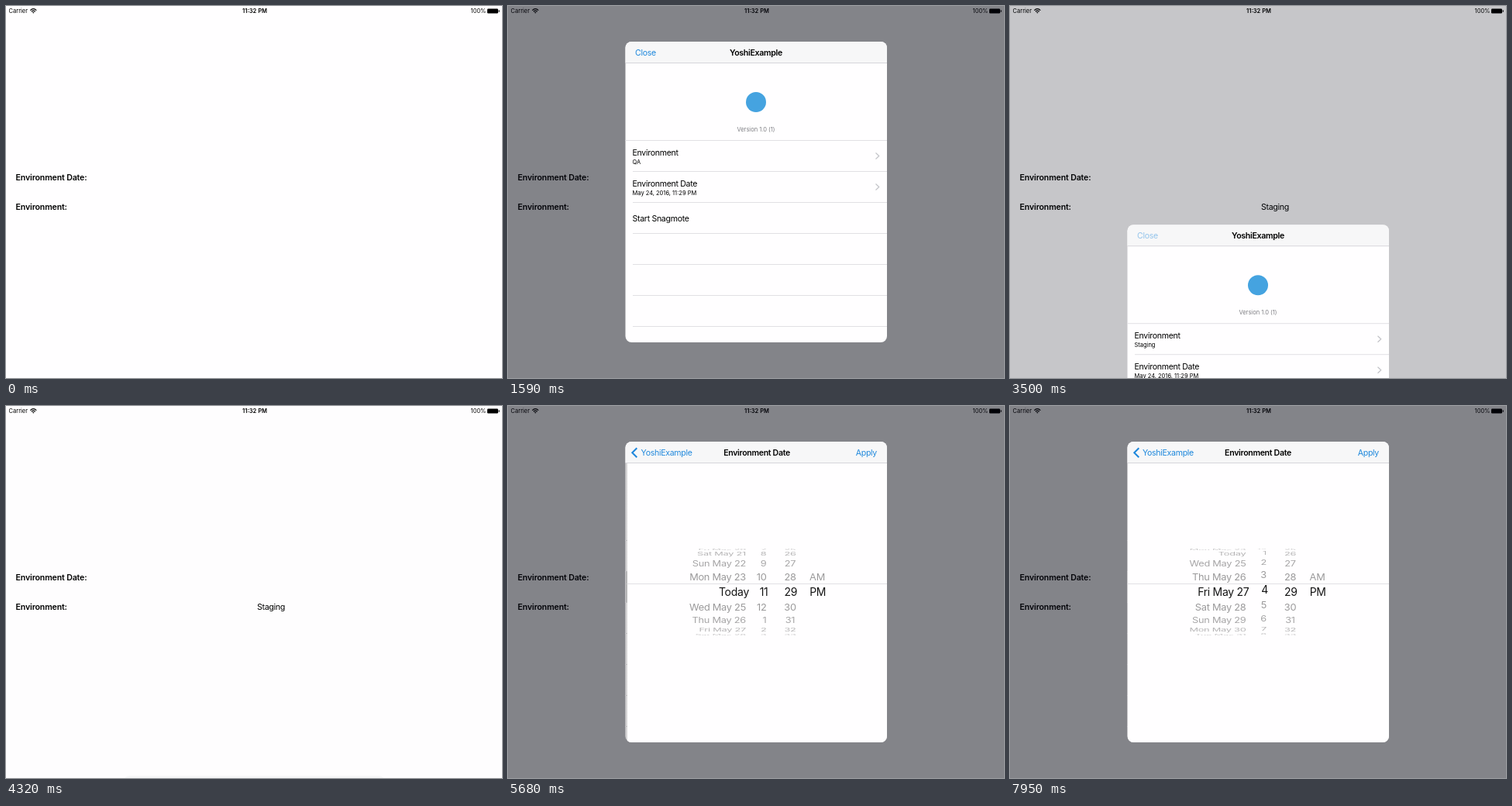
These frames come from a looping animation (640x480 px, 8 s). An HTML page:

```html
<!DOCTYPE html>
<html lang="en">
<head>
<meta charset="utf-8">
<title>Debug menu</title>
<style>
  html, body { margin: 0; width: 100%; height: 100%; overflow: hidden; background: #fff; }
  svg { display: block; width: 640px; height: 480px; }
  text { font: 10.6px Inter, "Open Sans", sans-serif; letter-spacing: -.03em; fill: #000; white-space: pre; }
  .bold { font-weight: 600; }
  .label { letter-spacing: -.013em; }
  .small { font-size: 7.5px; letter-spacing: 0; }
  .blue { fill: #1d87dc; }
  .grey { fill: #7c7c81; }
  .mid { text-anchor: middle; }
  .end { text-anchor: end; }
  .line { stroke: #e1e0e4; fill: none; }
  .arrow { stroke: #c3c3c8; stroke-width: 1.2; fill: none; }
  .pick { font-size: 12.8px; letter-spacing: -.02em; }
  .pick.on { font-size: 14px; }
</style>
</head>
<body>
<svg viewBox="0 0 640 480">
  <defs>
    <clipPath id="card"><rect x="151.5" y="46" width="337.5" height="388" rx="8"/></clipPath>
    <linearGradient id="edge">
      <stop offset="0" stop-color="#000" stop-opacity="0"/>
      <stop offset="1" stop-color="#000" stop-opacity=".1"/>
    </linearGradient>
  </defs>

  <rect width="640" height="480" fill="#fffeff"/>
  <text class="bold label" x="12.5" y="225">Environment Date:</text>
  <text class="bold label" x="12.5" y="262.5">Environment:</text>
  <text id="homeValue" x="324" y="262.5"></text>
  <text class="small" x="3.5" y="9">Carrier</text>
  <g fill="none" stroke="#000" stroke-width="1.2">
    <path d="M31.3 5.6Q35.3 1.8 39.3 5.6M32.9 7.3Q35.3 5.1 37.7 7.3"/>
    <path d="M35.3 9.6L34 8.2Q35.3 7.2 36.6 8.2Z" fill="#000" stroke="none"/>
  </g>
  <text class="small bold mid" x="321" y="9">11:32 PM</text>
  <text class="small end" x="619.5" y="9">100%</text>
  <rect x="621" y="3.5" width="14" height="6" rx="1.2"/>
  <rect x="635.6" y="5.2" width="1.2" height="2.6" rx=".5"/>
  <rect id="dim" width="640" height="480" fill="#04050f"/>

  <g id="sheet"><g clip-path="url(#card)">
    <rect x="151" y="46" width="339" height="388" fill="#fffeff"/>
    <g id="menu">
      <rect id="menuRow" x="151" width="339" height="40" fill="#d9d9db"/>
      <circle cx="320" cy="124" r="13" fill="#45a3e0"/>
      <text class="small grey mid" x="320" y="162">Version 1.0 (1)</text>
      <path class="line" d="M151 173.5H490"/>
      <g id="menuLines"></g>
      <text x="160.5" y="193.2">Environment</text>
      <text id="menuValue" class="small" x="160.5" y="203.5"></text>
      <text x="160.5" y="233.2">Environment Date</text>
      <text class="small" x="160.5" y="243.5">May 24, 2016, 11:29 PM</text>
      <text x="160.5" y="277.5">Start Snagmote</text>
      <path class="arrow" d="M474.5 189.5L478.7 193.5L474.5 197.5M474.5 229.5L478.7 233.5L474.5 237.5"/>
    </g>
    <rect id="shade" x="151" y="73" width="339" height="361"/>
    <g id="page">
      <rect id="pageEdge" x="146.5" y="73" width="5" height="361" fill="url(#edge)"/>
      <rect x="151.5" y="73" width="340" height="361" fill="#fffeff"/>
      <g id="list">
        <g id="listLines"></g>
        <rect id="listRow" x="151.5" y="113" width="339" height="40.5" fill="#d9d8da"/>
        <text x="161" y="97.3">Production</text>
        <text x="161" y="137.3">Staging</text>
        <text x="161" y="177.3">QA</text>
      </g>
      <g id="picker">
        <path class="line" d="M151 229.5H490"/>
        <g id="wheels"></g>
      </g>
    </g>
    <rect x="151" y="46" width="339" height="27" fill="#f7f7f8"/>
    <path d="M151 73.5H490" stroke="#d6d6da"/>
    <text id="close" class="blue" x="164" y="64">Close</text>
    <text id="menuTitle" class="bold mid" y="64">YoshiExample</text>
    <path id="backArrow" d="M166.3 54.2L160.3 60.2L166.3 66.2" fill="none" stroke="#1d87dc" stroke-width="2"/>
    <text id="backLabel" class="blue" y="64">YoshiExample</text>
    <text id="pageTitle" class="bold mid" y="64"></text>
    <text id="apply" class="blue end" x="476" y="64">Apply</text>
  </g></g>
</svg>
<script>
const LOOP = 8000, ROW_ANGLE = 20.5 * Math.PI / 180, RADIUS = 55.5;
const $ = Object.fromEntries([...document.querySelectorAll('[id]')].map(el => [el.id, el]));
const set = (el, attrs) => { for (const k in attrs) el.setAttribute(k, attrs[k]); };
const clamp = v => Math.max(0, Math.min(1, v));
const mod = (n, m) => ((n % m) + m) % m;

// Critically damped spring from 0 to 1, time in ms.
const spring = ms => {
  const x = Math.max(0, ms) * 0.024;
  return 1 - (1 + x) * Math.exp(-x);
};
const smooth = v => { v = clamp(v); return v * v * (3 - 2 * v); };
const easeOut = v => 1 - (1 - clamp(v)) ** 2;

const rules = (first, count) => Array.from({ length: count }, (_, i) =>
  `<path class="line" d="M161 ${first + 40 * i}H490"/>`).join('');
$.menuLines.innerHTML = rules(213.5, 6);
$.listLines.innerHTML = rules(113.5, 8);

const DAYS = ['Sun', 'Mon', 'Tue', 'Wed', 'Thu', 'Fri', 'Sat'];
const dayName = i => i === 0 ? 'Today' : `${DAYS[mod(i + 2, 7)]} May ${24 + i}`;

// Each wheel: x beside and in the selected row, alignment, label and position.
const wheels = [
  { side: 304.5, mid: 308.5, align: 'end', label: dayName,
    pos: t => 3 * smooth((t - 5940) / 720) },
  { side: 331, mid: 333, align: 'end', label: i => String(mod(i - 1, 12) + 1),
    pos: t => 23 - 4 * smooth((t - 6770) / 760) - 3 * easeOut((t - 7570) / 490) },
  { side: 361.5, mid: 362.3, align: 'mid', label: i => String(mod(i, 60)).padStart(2, '0'),
    pos: () => 29 },
  { side: 396.5, mid: 397.2, align: 'mid', label: i => ['AM', 'PM'][i] || '',
    pos: () => 1 },
];

function wheelRows(wheel, t) {
  const pos = wheel.pos(t), base = Math.round(pos);
  let rows = '';
  for (let i = base - 4; i <= base + 4; i++) {
    const angle = (i - pos) * ROW_ANGLE, squash = Math.cos(angle);
    if (squash < 0.06) continue;
    const on = i === base;
    const y = 240 + RADIUS * Math.sin(angle);
    const alpha = on ? 0.92 : 0.18 + 0.23 * squash;
    rows += `<text class="pick ${wheel.align}${on ? ' on' : ''}" y="${on ? 5.1 : 4.6}" opacity="${alpha}"` +
      ` transform="translate(${on ? wheel.mid : wheel.side} ${y}) scale(1 ${squash})">${wheel.label(i)}</text>`;
  }
  return rows;
}

function sheetShown(t) {
  if (t < 3425) return spring(t - 676);
  return t < 4316 ? 1 - spring(t - 3425) : spring(t - 4316);
}

function pageShown(t) {
  if (t < 2730) return spring(t - 1700);
  return t < 5390 ? 1 - spring(t - 2730) : spring(t - 5390);
}

function draw(t) {
  const shown = sheetShown(t), q = pageShown(t), dated = t >= 4316;
  const value = t < 2730 ? 'QA' : 'Staging';

  $.homeValue.textContent = t < 2730 ? '' : value;
  $.menuValue.textContent = value;
  set($.dim, { opacity: 0.49 * shown });
  set($.sheet, { transform: `translate(0 ${434 * (1 - shown)})` });

  set($.menu, { transform: `translate(${-101 * q} 0)` });
  const pressed = (t > 1620 && t < 2730) || t > 5300;
  set($.menuRow, { y: dated ? 213.5 : 173.5, opacity: pressed ? 1 : 0 });
  set($.shade, { opacity: 0.09 * q });
  set($.page, { transform: `translate(${338 * (1 - q)} 0)` });
  set($.pageEdge, { opacity: q });
  set($.list, { display: dated ? 'none' : 'inline' });
  set($.picker, { display: dated ? 'inline' : 'none' });
  set($.listRow, { opacity: t >= 2590 ? 1 : 0 });
  if (dated) $.wheels.innerHTML = wheels.map(w => wheelRows(w, t)).join('');

  const closing = t >= 3425 && t < 4316;
  set($.close, { opacity: clamp(1 - 2 * q) * (closing ? 0.45 : 1) });
  set($.menuTitle, { x: 320 - 115 * q, opacity: clamp(1 - 2 * q) });
  set($.backLabel, { x: 171 + 84 * (1 - q), opacity: q * q });
  set($.backArrow, { opacity: q });
  $.pageTitle.textContent = dated ? 'Environment Date' : 'Environment';
  set($.pageTitle, { x: 320 + 144 * (1 - q), opacity: clamp(2 * q - 1) });
  set($.apply, { opacity: dated ? clamp(2 * q - 1) : 0 });
}

const start = performance.now();
function tick() {
  draw((performance.now() - start) % LOOP);
  requestAnimationFrame(tick);
}
tick();
</script>
</body>
</html>
```
